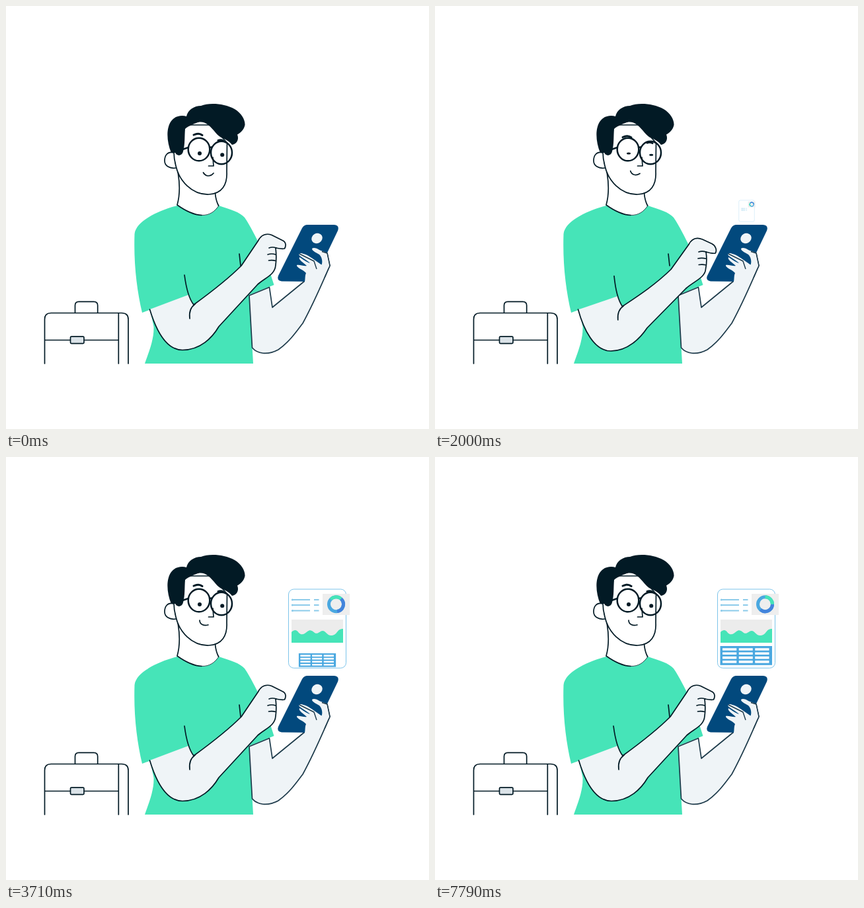
These frames come from a looping animation (640x640 px, 9.57 s). An HTML page:

```html
<!DOCTYPE html>
<html lang="en">
<head>
<meta charset="utf-8">
<title>Man with phone</title>
<style>
html, body { margin: 0; width: 100%; height: 100%; overflow: hidden; background: #fff; }
svg { display: block; width: 100%; height: 100%; }
.line { fill: none; stroke: #021a25; stroke-width: 1.7; stroke-linecap: round; stroke-linejoin: round; }
.shirt { fill: #46e4b8; }
.skin { fill: #eff4f7; }
.far { stroke: #1d3a4a; stroke-width: 1.7; stroke-linejoin: round; }
.ink { fill: #021a25; }
</style>
</head>
<body>
<svg viewBox="0 0 640 640">
  <!-- briefcase -->
  <g class="line">
    <path d="M58.5 541V474Q58.5 464.5 68 464.5H175Q185 464.5 185 474V541M170.3 465V541M58.5 505.5H170M104.5 464V453Q104.5 447.3 110 447.3H133Q138.7 447.3 138.7 453V464"/>
    <rect x="97.5" y="500.2" width="20.5" height="10.4" rx="1.5" fill="#dbe3e8"/>
  </g>

  <!-- shirt and neck -->
  <path class="shirt" d="M259 302C275 312 285 316.500 296 317C308 317 316 311 322 302C340 308 354 312 361 320C370 333 378 350 385 364C393 382 399 402 405.500 422L368 437L374 541H210C219 516 224 502 223.500 485L218 459.500L206 464C198 430 193 390 194.500 345C197 325 230 310 259 302Z"/>
  <path class="line" d="M259 246C263 265 263.500 285 259 301C273 311 284 316 296 316.500M316.500 283C317 290 319 297 321.500 302M353 375L355 393"/>
  <path class="line" style="stroke-width:.8" d="M296 316.500C308 317 316 311 322 302"/>

  <!-- head -->
  <path class="line" fill="#fff" d="M254 222C244 219 240 227 240 234C240 242 248 246.500 257 245"/>
  <path class="line" style="fill:#fff" d="M254 221C254 229 255 235 257 242C262 264 281 286 307 285C327 284 335 270 334 251L334.500 207L310 180H270Z" stroke="none"/>
  <g id="brows" class="line" style="stroke-width:3">
    <path d="M284 195C289 192.500 294 193 297 195.500M321 203.500Q325 202 329 204"/>
  </g>
  <path class="ink" d="M250 222C243 205 242 185 250 174C256 166 266 165 273 167C275 157 285 151 295 151C307 146 330 147 346 156C356 162 362 172 361.500 180C360 187 356 191 350 194.500C353 202 349 209 342 210C338 205 333 202 328 200C319 197 315 187 306 180C300 175 293 174.500 288 177C282 179 274 183 271 186C270 197 271 210 268 220C266 228 258 227 256 222Z"/>
  <g class="line" style="stroke-width:2.5">
    <ellipse cx="292" cy="217" rx="16.300" ry="17.300"/>
    <ellipse cx="326" cy="222" rx="16" ry="17.300"/>
    <path d="M308 214L311 213.500M276 214L267 217"/>
  </g>
  <path class="line" d="M313 229L314 242H306.500"/>
  <ellipse id="eyeL" class="ink" cx="293" cy="223" rx="3"/>
  <ellipse id="eyeR" class="ink" cx="327.200" cy="225.200" rx="3"/>
  <path id="mouth" class="line"/>

  <!-- report -->
  <g id="card">
    <rect x="427.500" y="200" width="87" height="119.300" rx="8" fill="#fff" stroke="#7cc4ea"/>
    <rect x="479" y="207" width="41" height="32" fill="#eee"/>
    <g id="donut" fill="none" stroke-width="5">
      <circle cx="499.500" cy="222.700" r="11" stroke="#4aa8e0"/>
      <path d="M510.500 222.700A11 11 0 0 1 492.400 231.100" stroke="#4384dc"/>
      <path d="M499.500 211.700A11 11 0 0 1 510.500 222.700" stroke="#46e4b8"/>
    </g>
  </g>
  <g id="list" stroke="#8ccbea" stroke-width="2.200">
    <path d="M433 216H460M466 216H473.500M433 224H460M466 224H473.500M433 232.500H460M466 232.500H473.500"/>
    <path stroke-width="3" stroke-linecap="round" d="M433.300 216h.1M433.300 224h.1M433.300 232.500h.1"/>
  </g>
  <g id="chart">
    <rect x="432" y="246" width="78" height="35" fill="#ececec"/>
    <path class="shirt" d="M432 265C437 260 440 262 443 266C448 271 452 267 456 264C461 260 464 264 467 266C472 269 475 263 479 263C484 263 486 271 493 270C502 269 500 260 510 260V281H432Z"/>
  </g>
  <g id="table">
    <rect x="431.500" y="286" width="78.500" height="28.800" fill="#4aa8e0"/>
    <path stroke="#fff" stroke-width="3.600" d="M435 291H505.500M435 297.300H505.500M435 303.600H505.500M435 309.900H505.500"/>
    <path stroke="#4aa8e0" stroke-width="3.500" d="M458 287V314M482.500 287V314"/>
  </g>

  <!-- far arm with phone -->
  <path class="skin far" d="M452 416L403 456L398.500 425.500L368 438L372.500 517C380 526 395 529 412 520C429 508 440 492 449 480C466 449 478 420 490 393L486 374L470 372Z"/>
  <path fill="#02497d" d="M456 331H496Q505 331.500 502 340L468 411Q465 417 458 417L417 416.500Q409 415 412 408L448 336Q451 331 456 331Z"/>
  <ellipse class="skin" cx="470.500" cy="351.500" rx="8.500" ry="7.500" transform="rotate(-30 470.500 351.500)"/>
  <path class="skin" d="M489.500 393L485.500 374C482 371 478 371 474 369C470 366 465 365 463 367C463 371 470 373 474 376C478 380 479 385 478 392L468 385C461 380 455 376 450 375C446 373 443 374 443.500 377C448 381 456 385 460 389C455 388 449 383 444 380C442 384 450 388 455 393C451 394 444 391 440 392C439 396 450 399 454 404C452 409 453 413 452 417L466 430L482 405Z"/>
  <path class="far" fill="none" d="M478 371.500L486 374L490 393L482 411M444 375L466 386L470 398" style="stroke-width:1.400"/>

  <!-- near arm -->
  <path id="elbow" class="skin"/>
  <path id="arm" class="line" style="fill:#eff4f7"/>
  <path id="folds" class="line"/>
</svg>
<script>
const LOOP = 9570, FPS = 14;
const $ = id => document.getElementById(id);

// Each shape: resting path, then path at the end of its move.
const shapes = {
  elbow: ["M217.5 459L276 437L284 452L250 485Z", "M215.5 460L276.5 441L283 457L248 488Z"],
  arm: [
    "M217.5 459C226 487 241 520.5 267 520.5C294 520.5 312 502 322 485L381 421C392 411 407 407 408 392C409 385 409 375 408 366C413 367 418 368 421.5 367C424 363 424 357 418 354.5L402 346.5C394 343.5 386 346 381 356L356 393C332 417 306 436 284 452",
    "M215.5 459C223 490 240 523.5 265 523.5C290 523.5 310 502 320 489L378 434C390 423 411 415 411 404C413 396 414 388 412 378C417 380 423 382 427 381C430 376 425 368 420 365L407 359.5C399 356 391 357 386 367L358 404C334 427 306 443 283 457"
  ],
  folds: [
    "M270 407C272 422 276 442 284 452M286 451C279 456 277 465 278 473M398 366Q403 364 409 366M396 376Q402 374 408 376M397.5 385Q403 384 408 385.5",
    "M272 410C273 425 277 447 283 457M285 456C277 461 275 469 275.5 477M400 378Q406 376 413 379M400 388Q406 387 412 388.5M401 398Q406 397 411 398"
  ],
  mouth: ["M298.5 252C302 258.500 309 258.500 314 253", "M293 247C293 253 299 256 306 254"]
};

const ease = (t, start, end) => {
  const u = Math.min(1, Math.max(0, (t - start) / (end - start)));
  return u * u * (3 - 2 * u);
};

function morph(id, p) {
  const [from, to] = shapes[id];
  const ends = to.match(/[\d.]+/g);
  let i = 0;
  $(id).setAttribute("d", from.replace(/[\d.]+/g, n => (+n + (ends[i++] - n) * p).toFixed(2)));
}

// Grow a part out of the phone's top edge.
function emerge(id, p, y = 328.7) {
  $(id).setAttribute("transform", `translate(471.7 ${y}) scale(${p}) translate(-471.7 ${-y})`);
  $(id).style.visibility = p > 0 ? "visible" : "hidden";
}

const blink = (t, start) => ease(t, start, start + 640) - ease(t, start + 1220, start + 1790);

function draw(t) {
  const reach = ease(t, 0, 1000) - ease(t, 1000, 3000);
  for (const id of ["elbow", "arm", "folds"]) morph(id, reach);
  morph("mouth", ease(t, 1000, 3000));

  const frown = ease(t, 0, 1000) - ease(t, 1600, 2900);
  $("brows").setAttribute("transform", `translate(0 ${4.5 * frown})`);
  const lids = blink(t, 1360) + blink(t, 6000);
  for (const id of ["eyeL", "eyeR"]) $(id).setAttribute("ry", 2.9 - 1.4 * lids);

  emerge("card", ease(t, 1590, 2790));
  emerge("list", ease(t, 1655, 2855));
  emerge("chart", ease(t, 2400, 3600));
  emerge("table", ease(t, 2910, 4150), 325);
  $("donut").setAttribute("transform", `rotate(${150 * (ease(t, 1600, 5000) - 1)} 499.5 222.7)`);
}

function tick() {
  const t = performance.now() % LOOP;
  draw(Math.floor((t + 5) * FPS / 1000) * 1000 / FPS);
  requestAnimationFrame(tick);
}
tick();
</script>
</body>
</html>
```
